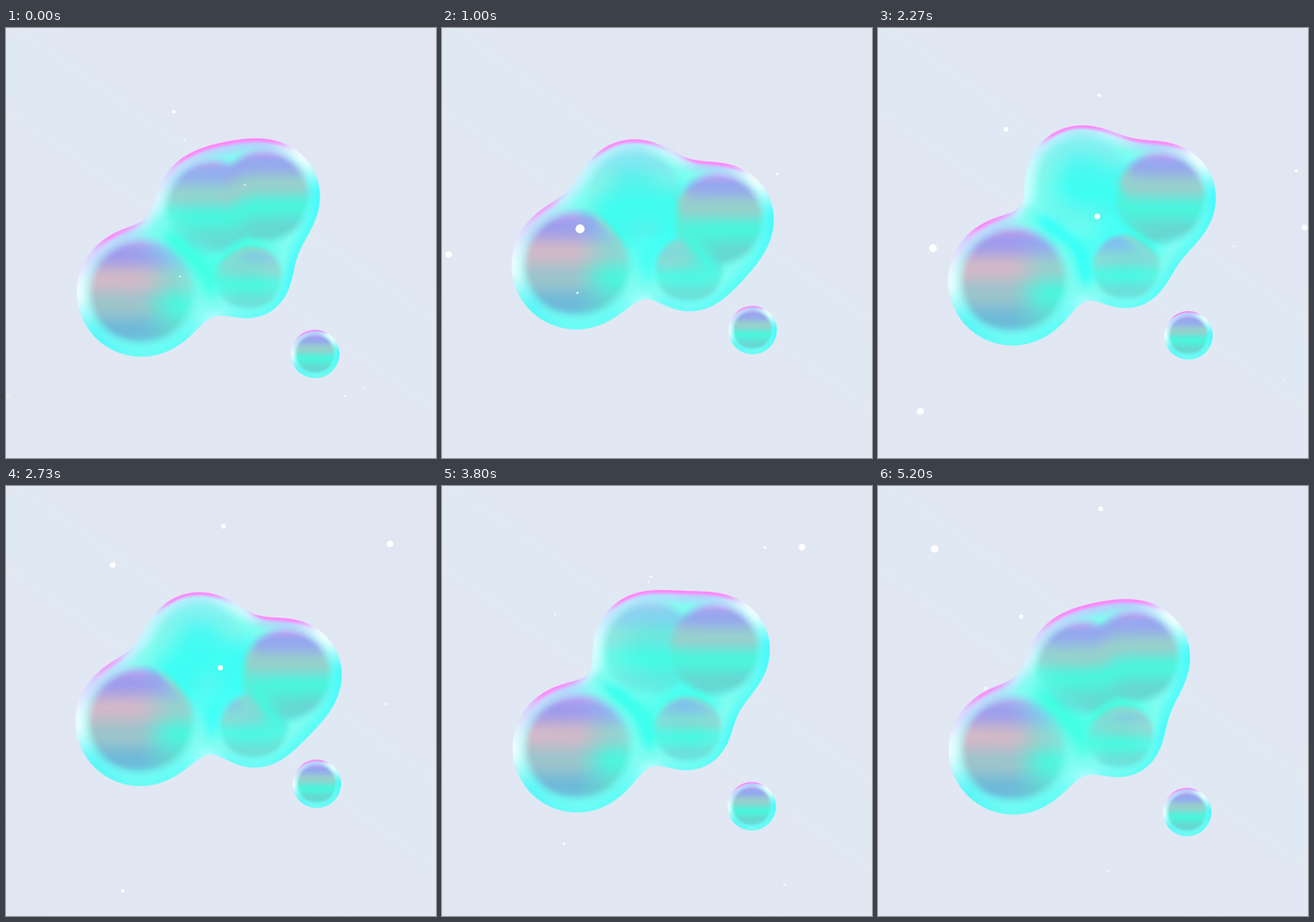
An HTML page with a canvas for the animation above (5.27 s loop, 480 px wide and 480 px high).

```html
<!DOCTYPE html>
<html lang="en">
<head>
<meta charset="utf-8">
<title>Iridescent blob</title>
<style>
  html, body { margin: 0; width: 100%; height: 100%; overflow: hidden; }
  body { background: linear-gradient(35deg, #e1e7f2, #e1e8f3 46%, #dfe9f3 52%, #e0e9f3 58%, #e1e7f2 64%, #e1e7f2); }
  canvas { display: block; width: 480px; height: 480px; }
</style>
</head>
<body>
<canvas id="stage" width="480" height="480"></canvas>
<script>
const SIZE = 480, LOOP = 5270, FRAMES = 79, PERIOD = LOOP / 3;
const BETA = 0.0004; // higher keeps the balls more distinct
const ctx = document.getElementById('stage').getContext('2d');
const image = ctx.createImageData(SIZE, SIZE);

const clamp = x => Math.max(0, Math.min(1, x));
const smooth = (a, b, x) => { const k = clamp((x - a) / (b - a)); return k * k * (3 - 2 * k); };
const mix = (a, b, k) => a + (b - a) * k;
const swing = (t, peak) => Math.cos(2 * Math.PI * (t - peak) / PERIOD);
const rgb = hex => [0, 2, 4].map(i => parseInt(hex.substr(i, 2), 16));

// Lookup of 257 steps through evenly spaced colours
function ramp(...hexes) {
  const keys = hexes.map(rgb), last = keys.length - 1;
  const lut = new Float32Array(257 * 3);
  for (let i = 0; i <= 256; i++) {
    const p = i / 256 * last, k = Math.min(last - 1, Math.floor(p));
    for (let c = 0; c < 3; c++) lut[i * 3 + c] = mix(keys[k][c], keys[k + 1][c], smooth(0, 1, p - k));
  }
  return lut;
}

// Core colours from top to bottom, rim colours clockwise from the right
const COOL = ramp('ff8cfa', '96a8ee', '96d0cd', '4cf4dc', '66d8d2', '5af5f5');
const WARM = ramp('f096fa', 'a09beb', 'd0b9c8', '9cc4cb', '6ebad8', '64f5f5');
const RIM = ramp('46fafc', '5afcf6', '69fcf6', '5af6f8', 'f0fcff', 'dccfff', 'c3c4ff', 'f5fcff', '46fafc');
const [AQUA, CYAN, MIST, PALE, PINK] = ['42ffe2', '3cfffa', '80fcf0', 'beffff', 'ff84fa'].map(rgb);

// "core" is how clearly the darker heart of a ball shows, "warm" its pink tint
function cluster(t, split) {
  const bob = swing(t, 30), wide = swing(t, 680);
  return [
    { x: 151 - (1 - bob) * .7, y: 285 + 16 * bob - 6 * bob * bob, r: 72, core: 1, warm: 1 },
    { x: 223 + 9 * swing(t, 200), y: 189 - 19 * swing(t, 600), r: 62, core: 1 - split, warm: 0 },
    { x: 302 + 17 * wide, y: 198 - 16 * swing(t, 230), r: 61, core: 1, warm: 0 },
    { x: 274 + 4 * wide, y: 273 + 7 * swing(t, -200), r: 45, core: .75, warm: 0 }
  ];
}

function droplet(t) {
  const s = swing(t, -80);
  return [{ x: 346 - s, y: 353.7 + 17 * s - 6.7 * s * s, r: 27, core: 1, warm: 0 }];
}

function paint(balls, split) {
  const px = image.data, pad = 12;
  const x0 = Math.floor(Math.min(...balls.map(b => b.x - b.r)) - pad);
  const x1 = Math.ceil(Math.max(...balls.map(b => b.x + b.r)) + pad);
  const y0 = Math.floor(Math.min(...balls.map(b => b.y - b.r)) - pad);
  const y1 = Math.ceil(Math.max(...balls.map(b => b.y + b.r)) + pad);

  for (let y = y0; y <= y1; y++) for (let x = x0; x <= x1; x++) {
    let sum = 0, gx = 0, gy = 0, sharp = 0, local = 0, warm = 0, clear = 1;
    for (const b of balls) {
      const dx = x + .5 - b.x, dy = y + .5 - b.y, d2 = dx * dx + dy * dy;
      const e = b.weight = Math.exp(BETA * (b.r * b.r - d2));
      sum += e; gx += e * dx; gy += e * dy;
      const e3 = e * e * e;
      sharp += e3;
      local += e3 * dy / b.r;
      warm += e3 * b.warm * (1 - smooth(-.1, .6, dx / b.r));
      clear *= 1 - b.core * (1 - smooth(.7, .94, Math.sqrt(d2) / b.r));
    }
    if (sum < .9) continue;
    gx /= sum; gy /= sum;
    const h = Math.log(sum) / BETA, len = Math.hypot(gx, gy);
    const cover = clamp(h / (2 * Math.max(len, 1)) + .5);
    if (!cover) continue;

    // Tilt of the surface: 0 faces the viewer, 1 is the silhouette
    const tilt = len / (Math.sqrt(len * len + Math.max(h, 0)) || 1);
    let seam = 0, joint = 0;
    if (balls.length > 1) {
      const a = balls[0].weight / sum;
      seam = 4 * a * (1 - a);
      joint = Math.min(1, seam + split * balls[1].weight / sum);
    }
    const core = (1 - clear) * (1 - seam * .7 * (1 - split));
    const rim = smooth(.68, .98, tilt) * .94;
    const angle = (Math.atan2(gy, gx) / (2 * Math.PI) + 1) % 1;
    const line = smooth(.9, .99, tilt) * smooth(.6, .67, angle) * (1 - smooth(.77, .85, angle)) * (1 - seam * .85);
    const haze = smooth(.15, .75, tilt);
    const iv = Math.round(clamp(local / sharp / 2 + .5) * 256) * 3, ia = Math.round(angle * 256) * 3;
    const o = (y * SIZE + x) * 4;
    for (let k = 0; k < 3; k++) {
      const heart = mix(COOL[iv + k], WARM[iv + k], warm / sharp);
      const shell = mix(mix(AQUA[k], CYAN[k], split), MIST[k], haze);
      const edge = mix(RIM[ia + k], PALE[k], joint * .7);
      px[o + k] = mix(mix(mix(shell, heart, core), edge, rim), PINK[k], line);
    }
    px[o + 3] = cover * 255;
  }
}

// Dots fly outward from a vanishing point, growing as they come closer
const EYE = { x: 270, y: 245 }, DEPTH = 2400;
let seed = 11;
const random = () => (seed = seed * 16807 % 2147483647) / 2147483647;
const DOTS = Array.from({ length: 70 }, () => ({
  at: mix(-500, LOOP + 400, random()),
  x: SIZE * random(),
  y: SIZE * random(),
  r: .7 + 3.4 * random() ** 1.5
}));

function drawDots(t, dots) {
  for (const d of dots) {
    const age = t - d.at;
    if (age < -470 || age > 700) continue;
    const zoom = DEPTH / (DEPTH - age);
    const size = d.r * zoom * smooth(-470, -200, age) * (1 - smooth(500, 700, age));
    ctx.beginPath();
    ctx.arc(EYE.x + (d.x - EYE.x) * zoom, EYE.y + (d.y - EYE.y) * zoom, size, 0, 7);
    ctx.fill();
  }
}

function draw(t) {
  const split = .5 + .5 * swing(t, 720);
  image.data.fill(0);
  paint(cluster(t, split), split);
  paint(droplet(t), 0);
  ctx.putImageData(image, 0, 0);
  ctx.fillStyle = '#fff';
  drawDots(t, DOTS.filter(d => d.r >= 2));
  // Fine dots stay behind the blob
  ctx.globalCompositeOperation = 'destination-over';
  drawDots(t, DOTS.filter(d => d.r < 2));
  ctx.globalCompositeOperation = 'source-over';
}

const start = performance.now();
let shown = -1;
function tick() {
  const t = (performance.now() - start) % LOOP;
  const step = Math.floor(t / LOOP * FRAMES + .05) % FRAMES;
  if (step !== shown) draw((shown = step) * LOOP / FRAMES);
  requestAnimationFrame(tick);
}
tick();
</script>
</body>
</html>
```
